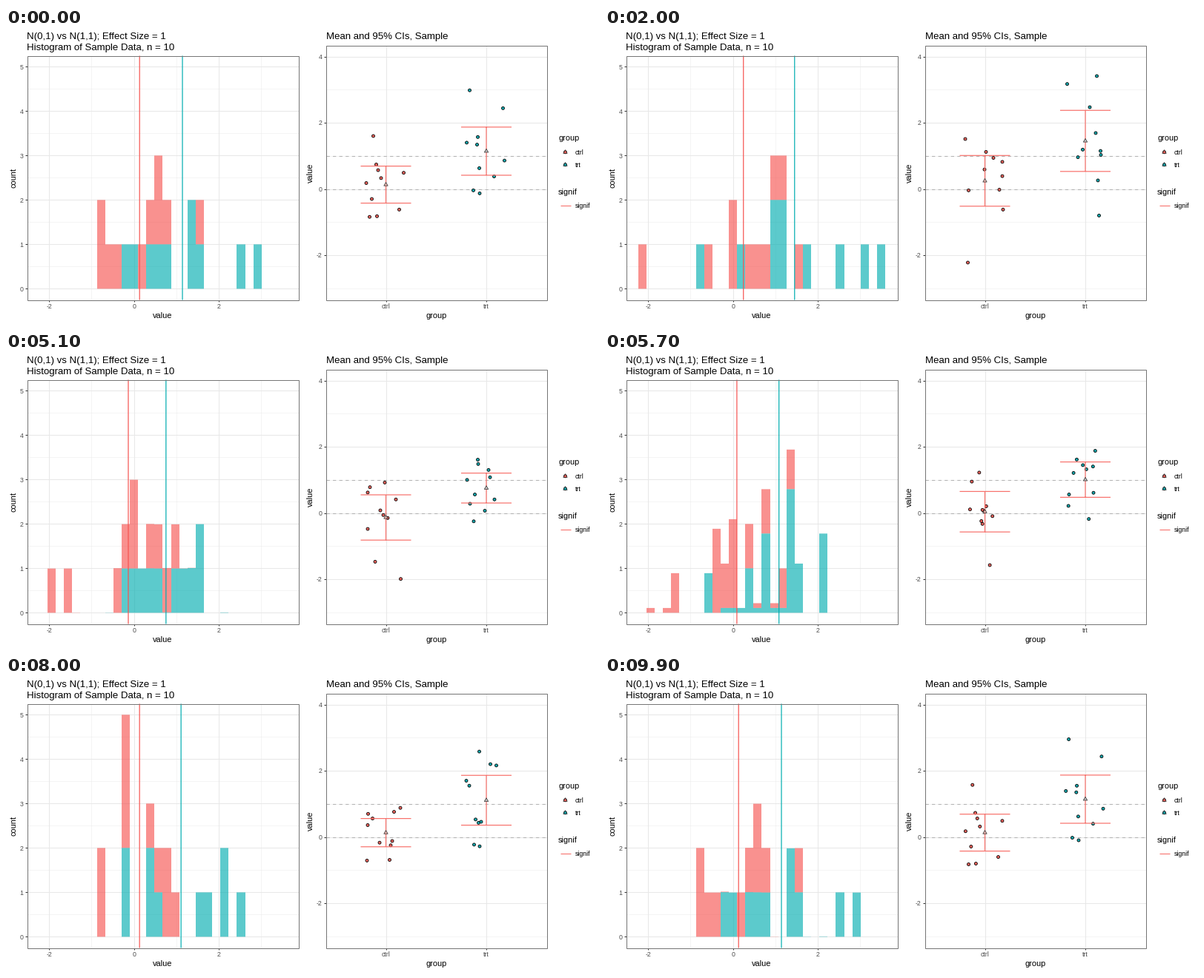
A matplotlib script for the animation above (10 s loop, 800x400 px).

```python
import numpy as np
import matplotlib.pyplot as plt
from matplotlib.animation import FuncAnimation
from matplotlib.patches import Rectangle

plt.rcParams["font.family"] = "Liberation Sans"

W, H, DPI = 800, 400, 100
PX = 72 / DPI  # points per pixel
FRAMES, STEP = 100, 20
RED, TEAL, SIGNIF = "#f65350", "#00adb0", "#f8706a"
FILLS = ["#e8605a", "#14a5ab"]
BINS, BIN_W = 30, 0.194
LEFT, RIGHT = (28.5, 37.5, 394.5, 367.5), (431.5, 23.5, 729.5, 367.5)
CENTERS = np.array([512.5, 648.0])

# five samples, each with a ctrl row and a trt row
VALUES = np.array([
    [[1.60, .74, .57, .49, .33, .18, -.30, -.84, -.82, -.62],
     [2.98, 2.44, 1.57, 1.40, 1.34, .86, .63, .38, -.04, -.13]],
    [[1.51, 1.12, .94, .82, .59, .39, -.04, -.02, -.62, -2.22],
     [3.17, 3.41, 2.47, 1.69, 1.19, 1.15, 1.03, .96, .26, -.80]],
    [[.92, .62, -1.47, -.48, .41, .78, -.06, -.15, .08, -1.99],
     [.41, 1.48, 1.00, 1.61, 1.30, 1.08, .07, .28, -.25, .56]],
    [[1.36, 1.10, .76, .38, -.05, -.06, -.11, -.41, -.39, -1.38],
     [2.17, 2.06, 1.59, 1.37, 1.33, 1.27, .86, .69, .43, -.52]],
    [[-.69, -.17, -.12, .36, -.71, -.25, .76, .56, .70, .88],
     [.43, 1.70, -.28, .46, 2.16, .53, -.23, 2.20, 1.55, 2.58]],
])
# horizontal jitter in pixels
JITTER = np.array([
    [[-17, -13, -10.5, 24, -6.5, -26.5, -19, -22, -12, 18],
     [-22.5, 22.5, -11.5, -26.5, -12.5, 24.5, -9.5, 10.5, -17.5, -9]],
    [[-26.5, 1.5, 11.5, 23.5, -.5, 23.5, -22, 19.5, 24.5, -23],
     [-24.5, 15.5, 6, 14, -3.5, 20.5, 21, -10, 17, 18.5]],
    [[-1.5, -24.5, -14.5, -24.5, 13.5, -21.5, -3.5, 2.5, -7.5, 20],
     [11, -11, -26, -11.5, 3, 5, -2, -22, -17, -15.5]],
    [[-10.5, -14.5, 5, -18, -11, 12.5, 16.5, -6, -3.5, .5],
     [-22, 24.5, 27, .5, .5, -25.5, 17, -22, -25.5, 14]],
    [[5, -8.5, 8.5, -24.5, -25.5, 6.5, 11, -18, -24, 19.5],
     [-10.5, -27, -9, -7, 13.5, -14.5, -16.5, 5.5, -23, -9.5]],
])


def hist_x(v):
    return 172.6 + 57.24 * v


def hist_y(n):
    return 352.4 - 60 * n


def mean_y(v):
    return 217.6 - 44.77 * v


def bin_counts(values):
    k = np.rint(values / BIN_W).astype(int) + 11
    return np.bincount(k, minlength=BINS).astype(float)


COUNTS = np.array([[bin_counts(g) for g in s] for s in VALUES])
MEANS = VALUES.mean(axis=2)
HALF_CI = 2.262 * VALUES.std(axis=2, ddof=1) / np.sqrt(VALUES.shape[2])

fig = plt.figure(figsize=(W / DPI, H / DPI), dpi=DPI, facecolor="white")
ax = fig.add_axes([0, 0, 1, 1])
ax.set_xlim(0, W)
ax.set_ylim(H, 0)
ax.axis("off")


def line(xs, ys, color, width, z=1, **kw):
    kw.setdefault("solid_capstyle", "butt")
    return ax.plot(xs, ys, color=color, lw=width * PX, zorder=z, **kw)[0]


def text(x, y, s, size, ha="left", color="black", rot=0):
    ax.text(x, y, s, fontsize=size * PX, ha=ha, va="baseline", color=color,
            rotation=rot, rotation_mode="anchor")


def panel(box, xs, ys, minor_xs, minor_ys):
    """Grid, ticks, labels and border; xs and ys map labels to pixels."""
    x0, y0, x1, y1 = box
    for x in minor_xs:
        line([x, x], [y0, y1], "#ebebeb", 0.55, 0)
    for y in minor_ys:
        line([x0, x1], [y, y], "#ebebeb", 0.55, 0)
    for s, x in xs.items():
        line([x, x], [y0, y1], "#e8e8e8", 1.07)
        line([x, x], [y1, y1 + 2.75], "#333333", 1, 8)
        text(x, 379.3, s, 8.8, "center", "#4d4d4d")
    for s, y in ys.items():
        line([x0, x1], [y, y], "#e8e8e8", 1.07)
        line([x0 - 2.75, x0], [y, y], "#333333", 1, 8)
        text(x0 - 5, y + 3.2, s, 8.8, "right", "#4d4d4d")
    ax.add_patch(Rectangle((x0, y0), x1 - x0, y1 - y0, fill=False,
                           ec="#757575", lw=PX, zorder=9))


panel(LEFT,
      {str(v): hist_x(v) for v in (-2, 0, 2)},
      {str(n): hist_y(n) for n in range(6)},
      [hist_x(v) for v in (-1, 1, 3)],
      [hist_y(n + 0.5) for n in range(5)])
panel(RIGHT,
      dict(zip(("ctrl", "trt"), CENTERS)),
      {str(v): mean_y(v) for v in (-2, 0, 2, 4)},
      [], [mean_y(v) for v in (-3, -1, 1, 3)])

text(28.5, 15, "N(0,1) vs N(1,1); Effect Size = 1", 13.2)
text(28.5, 29.7, "Histogram of Sample Data, n = 10", 13.2)
text(431.5, 15, "Mean and 95% CIs, Sample", 13.2)
text(211.5, 391.5, "value", 11, "center")
text(580.5, 391.5, "group", 11, "center")
text(14, 202.5, "count", 11, "center", rot=90)
text(414, 195.5, "value", 11, "center", rot=90)

for v in (0, 1):
    line(RIGHT[::2], [mean_y(v)] * 2, "#b4b4b4", 1.07, 2, dashes=(4, 4))


def dots(xy, fills, z=4):
    return ax.scatter(*np.transpose(xy), s=(4 * PX) ** 2, c=fills,
                      edgecolors="black", linewidths=0.8 * PX, zorder=z)


def triangles(xy, fills, z=6):
    return ax.scatter(*np.transpose(xy), s=(6.2 * PX) ** 2, marker=(3, 0, 0),
                      c=fills, edgecolors="#2a2a2a", linewidths=0.7 * PX,
                      zorder=z)


# legend
text(745, 152, "group", 11)
text(745, 225, "signif", 11)
keys = [(754.5, 167.8), (754.5, 184.8)]
dots(keys, FILLS)
triangles(keys, FILLS)
line([747.5, 761.5], [239.5, 239.5], SIGNIF, 1.07)
for s, y in (("ctrl", 170.8), ("trt", 187.8), ("signif", 242.8)):
    text(768, y, s, 8.8)

# moving parts
edges = np.rint(hist_x((np.arange(BINS + 1) - 11.5) * BIN_W))
bars = [[ax.add_patch(Rectangle((edges[k], hist_y(0)), edges[k + 1] - edges[k],
                                0, fc=c, ec="none", alpha=0.64, snap=False,
                                zorder=3))
         for k in range(BINS)] for c in (RED, TEAL)]
mean_lines = [line([0, 0], [LEFT[1], LEFT[3]], c, 1.2, 5, snap=False)
              for c in (RED, TEAL)]
points = dots(np.zeros((20, 2)), np.repeat(FILLS, 10))
error_bars = [line([], [], SIGNIF, 1.2, 5, snap=False) for _ in CENTERS]
mean_marks = triangles(np.zeros((2, 2)), ["#e9b4ae", "#c5c0c0"])


def ease(t):
    t = min(max(t, 0), 1)
    return 4 * t ** 3 if t < 0.5 else 1 - 4 * (1 - t) ** 3


def update(frame):
    state, step = divmod(frame, STEP)
    after = (state + 1) % len(VALUES)

    def mix(data, t):
        return data[state] + (data[after] - data[state]) * t

    # the histogram moves for 10 frames, the interval plot for 7
    t_hist, t_ci = ease((step - 10) / 10), ease((step - 13) / 7)

    ctrl, trt = mix(COUNTS, t_hist)
    for row, base, height in ((1, 0 * trt, trt), (0, trt, ctrl)):
        for bar, b, h in zip(bars[row], base, height):
            bar.set_y(hist_y(b))
            bar.set_height(-60 * h)
            bar.set_visible(h > 0)
    for ln, m in zip(mean_lines, mix(MEANS, t_hist)):
        ln.set_xdata([hist_x(m)] * 2)

    x = CENTERS[:, None] + mix(JITTER, t_ci)
    y = mean_y(mix(VALUES, t_ci))
    points.set_offsets(np.column_stack([x.ravel(), y.ravel()]))

    means, half = mix(MEANS, t_ci), mix(HALF_CI, t_ci)
    mean_marks.set_offsets(np.column_stack([CENTERS, mean_y(means)]))
    for ln, c, m, h in zip(error_bars, CENTERS, means, half):
        top, low = mean_y(m + h), mean_y(m - h)
        ln.set_data([c - 34, c + 34, np.nan, c, c, np.nan, c - 34, c + 34],
                    [top, top, np.nan, top, low, np.nan, low, low])
    return []


anim = FuncAnimation(fig, update, frames=FRAMES, interval=100, repeat=True,
                     repeat_delay=0, init_func=lambda: update(0))
plt.show()
```
